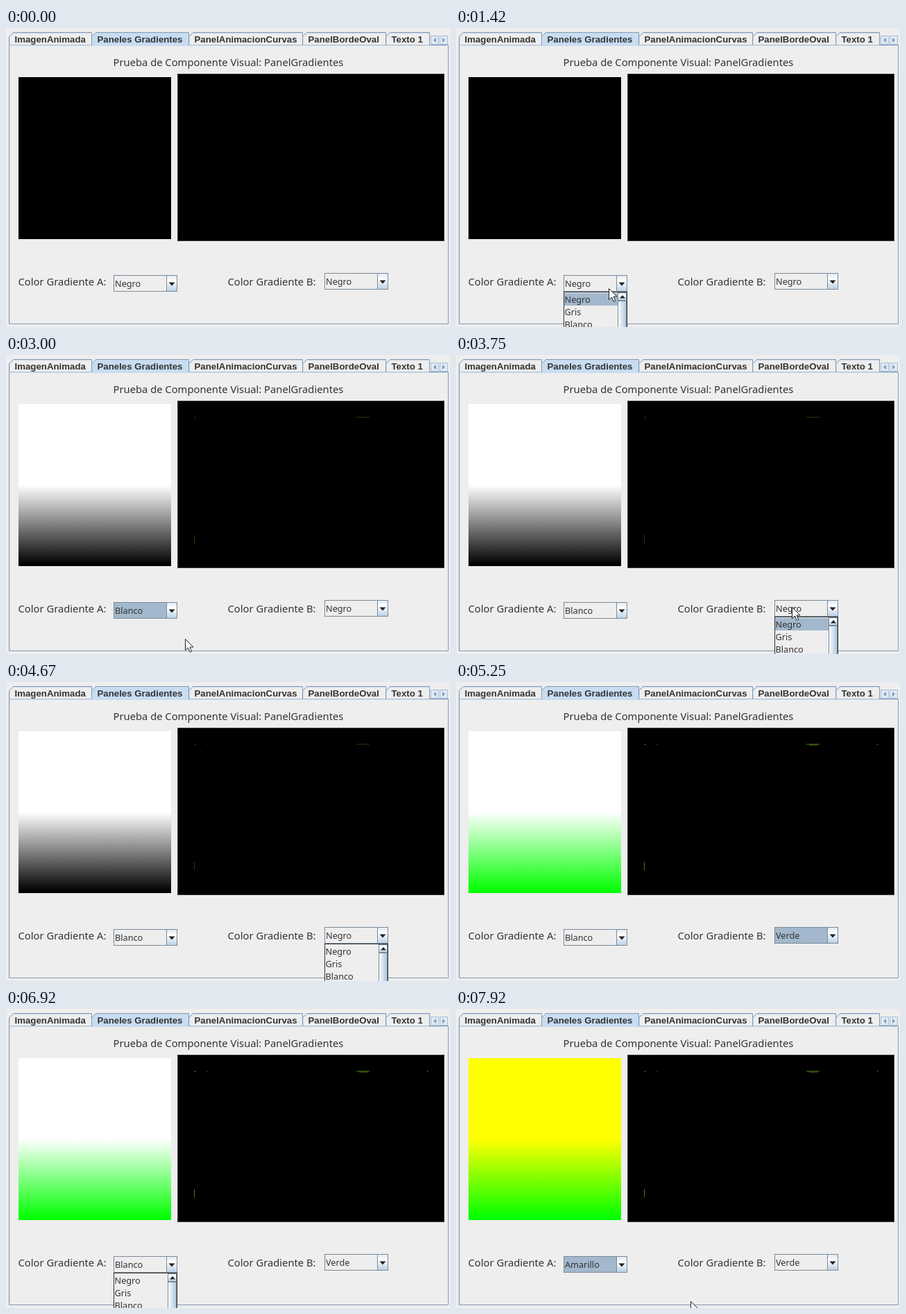
These frames come from a looping animation (640 px wide and 432 px high, 8 s). An HTML page:

```html
<!DOCTYPE html>
<html lang="es">
<head>
<meta charset="utf-8">
<title>Paneles Gradientes</title>
<style>
html, body { margin: 0; width: 100%; height: 100%; overflow: hidden; background: #eee; }
svg { display: block; }
text { fill: #333; font-family: "Noto Sans", "Open Sans", sans-serif; }
.tab { font: bold 13.25px "Liberation Sans", Arial, sans-serif; }
.label { font-size: 14.75px; }
.item { font-size: 12.7px; }
.line { fill: none; stroke: #8498b0; }
.shine { fill: none; stroke: #c8ddf2; }
.box { fill: #eee; stroke: #7a8a99; }
.button { fill: url(#metal); stroke: #7a8a99; }
.small { fill: #dfe9f4; stroke: #a9bfd6; }
.pick { fill: #a3b8cc; }
.arrow { fill: #222; }
.faint { fill: #7f9cba; }
</style>
</head>
<body>
<svg width="640" height="432" viewBox="0 0 640 432">
  <defs>
    <linearGradient id="metal" x2="0" y2="1">
      <stop stop-color="#dde8f3"/><stop offset=".35" stop-color="#fff"/><stop offset="1" stop-color="#b8cfe5"/>
    </linearGradient>
    <linearGradient id="thumb">
      <stop stop-color="#fff"/><stop offset="1" stop-color="#a9c4e0"/>
    </linearGradient>
    <linearGradient id="fade" gradientUnits="userSpaceOnUse" x1="0" y1="188" x2="0" y2="303">
      <stop id="top"/><stop id="bottom" offset="1"/>
    </linearGradient>
  </defs>

  <rect width="640" height="432" fill="#eee"/>
  <path class="shine" d="M5.500 427V25.500H636"/>
  <path class="line" d="M4.500 24.500H637.500V427.500H4.500Z"/>
  <g id="tabs"></g>
  <rect class="small" x="612.500" y="11.500" width="11" height="12"/>
  <rect class="small" x="625.500" y="11.500" width="11" height="12"/>
  <path class="faint" d="M620 14v7l-4-3.500zM629 14v7l4-3.500z"/>

  <text class="label" x="154.500" y="55">Prueba de Componente Visual: PanelGradientes</text>
  <rect x="18" y="71" width="220" height="234" fill="url(#fade)"/>
  <rect x="247.500" y="66.500" width="384" height="241" stroke="#3c444c"/>
  <g id="marks" fill="none">
    <path d="M271 91l3-1.500M289.500 90.500h1M505 90h19M271.500 260v12"/>
    <path id="extra" d="M509 91h12M607.500 89v2"/>
  </g>

  <text class="label" x="17.500" y="371.500">Color Gradiente A:</text>
  <text class="label" x="319.500" y="371.500">Color Gradiente B:</text>
  <g id="combos"></g>
  <path id="cursor" d="M.5 .5V16.500L4.500 13 7.200 19.300 9.700 18.200 7 12H12Z" fill="#fff" stroke="#222"/>
</svg>
<script>
const $ = id => document.getElementById(id);

const tabs = [
  [5, 123, "ImagenAnimada"],
  [124, 263, "Paneles Gradientes"],
  [264, 427, "PanelAnimacionCurvas"],
  [428, 547, "PanelBordeOval"],
  [548, 610, "Texto 1"]
];
$("tabs").innerHTML = tabs.map(([l, r, name], i) => {
  const on = i === 1;
  const edge = `M${l - .5} 24.500V12.500L${l + 5.500} 6.500H${r + .5}V24.500`;
  return `<path class="line" d="${edge}" style="fill:${on ? "#c8ddf2" : "#eee"}"/>
    <path class="shine" d="M${l + .5} 24V13L${l + 6} 7.500H${r}"/>
    ${on ? `<path d="M${l} 24.500H${r}" stroke="#c8ddf2" stroke-width="2"/>` : ""}
    <text class="tab" x="${l + 7.500}" y="21">${name}</text>`;
}).join("");

const rows = ["Negro", "Gris", "Blanco"];

function makeCombo(x, y, h) {
  const g = document.createElementNS("http://www.w3.org/2000/svg", "g");
  const top = h + 2;
  g.setAttribute("transform", `translate(${x} ${y})`);
  g.innerHTML = `
    <rect class="box" x=".5" y=".5" width="91" height="${h - 1}"/>
    <rect class="pick face" x="1" y="1" width="75" height="${h - 2}"/>
    <rect class="button" x="76.500" y=".5" width="15" height="${h - 1}"/>
    <path class="arrow" d="M79.500 10.500h9l-4.500 5z"/>
    <text class="item value" x="2" y="16.500"></text>
    <g class="popup">
      <rect x=".5" y="${h + .5}" width="91" height="100" fill="#eee" stroke="#333"/>
      <rect class="pick hover" x="1" width="77" height="18"/>
      ${rows.map((s, i) => `<text class="item" x="1.500" y="${top + 13.500 + i * 18}">${s}</text>`).join("")}
      <rect class="box" x="78.500" y="${h + 1.500}" width="12" height="90"/>
      <rect class="button" x="78.500" y="${h + 1.500}" width="12" height="11"/>
      <path class="arrow" d="M81 ${h + 9.500}h8l-4-4.500z"/>
      <rect x="78.500" y="${h + 13.500}" width="12" height="80" fill="url(#thumb)" stroke="#7a8a99"/>
    </g>`;
  $("combos").append(g);
  const part = name => g.querySelector("." + name);
  const [value, face, popup, hover] = ["value", "face", "popup", "hover"].map(part);

  return (text, focused, open, chosen, mouseY) => {
    const under = Math.floor((mouseY - y - top) / 18);
    value.textContent = text;
    face.setAttribute("display", focused ? "inline" : "none");
    popup.setAttribute("display", open ? "inline" : "none");
    hover.setAttribute("y", top + 18 * (under < 0 ? chosen : under));
  };
}
const comboA = makeCombo(155, 357, 24);
const comboB = makeCombo(459, 354, 24);

// Pointer path: step, x, y
const path = [
  [0, 330, -30], [1, 312, 70], [2, 258, 300], [3, 240, 367], [13, 240, 367],
  [14, 224, 366], [15, 224, 366], [25, 205, 417], [29, 201, 421], [34, 201, 421],
  [44, 484, 364], [48, 484, 364], [56, 478, 440], [66, 470, 440],
  [73, 222, 369], [75, 222, 369], [83, 214, 440], [94, 338, 440], [95, 338, 422]
];
function pointer(step) {
  const i = Math.max(1, path.findIndex(p => p[0] >= step));
  const [a, b] = [path[i - 1], path[i]];
  const k = (step - a[0]) / (b[0] - a[0]);
  return [1, 2].map(n => Math.round(a[n] + (b[n] - a[n]) * k));
}

const LOOP = 8000, FPS = 12;
let last = -1;

function draw(step) {
  const within = (a, b) => step >= a && step < b;
  const [x, y] = pointer(step);
  const white = step >= 33, green = step >= 62, yellow = step >= 91;

  $("cursor").setAttribute("transform", `translate(${x} ${y})`);
  comboA(yellow ? "Amarillo" : white ? "Blanco" : "Negro",
    within(33, 44) || yellow, within(13, 33) || within(75, 91), white ? 2 : 0, y);
  comboB(green ? "Verde" : "Negro", within(62, 75), within(45, 62), 0, y);

  $("top").setAttribute("stop-color", yellow ? "#ff0" : white ? "#fff" : "#000");
  $("bottom").setAttribute("stop-color", green ? "#0f0" : "#000");
  $("marks").setAttribute("display", white ? "inline" : "none");
  $("marks").setAttribute("stroke", green ? "#4f7a10" : "#35350c");
  $("extra").setAttribute("display", green ? "inline" : "none");
}

function tick() {
  // Small lead keeps steps on the rounded 10 ms clock
  const step = Math.min(95, Math.floor((performance.now() % LOOP + 4) * FPS / 1000));
  if (step !== last) draw(last = step);
  requestAnimationFrame(tick);
}
tick();
</script>
</body>
</html>
```
